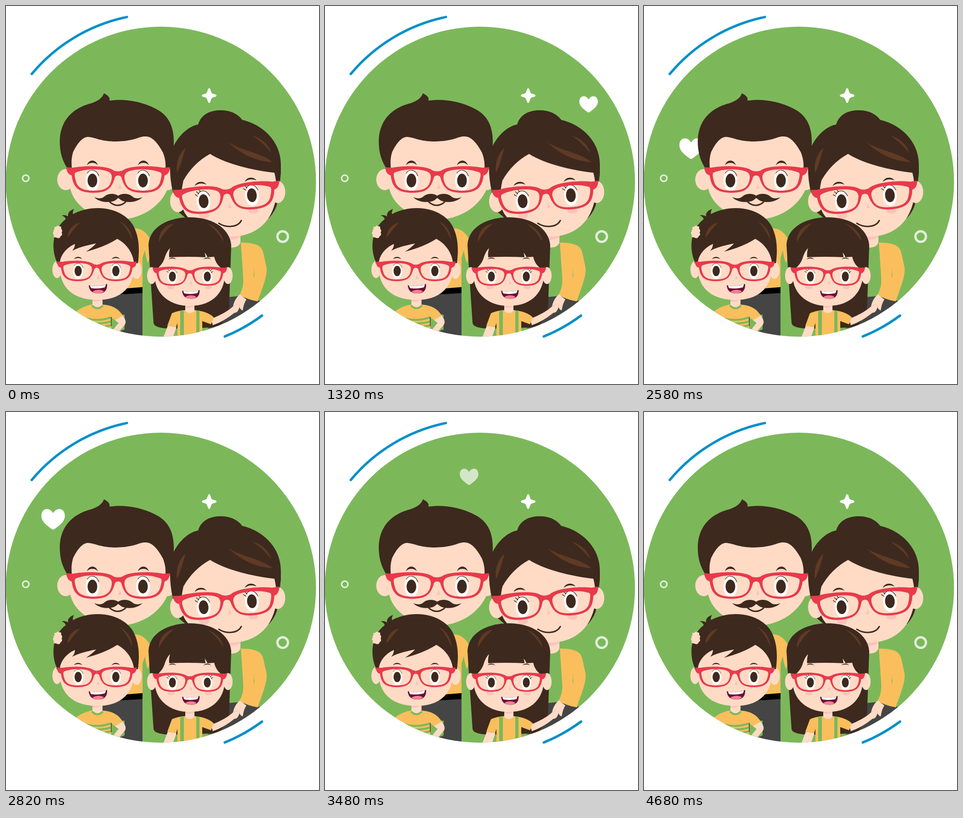
Write an HTML page that moves like this. It is 681 px wide and 823 px high and loops after 4800 ms.

```html
<!DOCTYPE html>
<html lang="en">
<head>
<meta charset="utf-8">
<title>Family portrait</title>
<style>
html, body { margin: 0; width: 100%; height: 100%; overflow: hidden; background: #fff; }
svg { display: block; }
.skin { fill: #ffdbc6; }
.hair { fill: #3d291e; }
.shine { fill: #5f3a24; }
.red { fill: #e83a4b; }
.gold { fill: #fabf5c; }
.green { fill: #7cb85a; }
.grey { fill: #454545; }
.pink { fill: #fcc3ba; }
.white { fill: #fff; }
.line { fill: none; stroke: #3d291e; stroke-linecap: round; }
</style>
</head>
<body>
<svg width="681" height="823" viewBox="0 0 681 823">
<defs>
  <clipPath id="disc"><circle cx="337" cy="382.5" r="337.5"/></clipPath>
  <path id="heart" d="M0 9C-4 2-9 0-13 0C-21 0-25.5 6-25.5 15C-25.5 29-10 38-4 43Q0 46 4 43C10 38 25.5 29 25.5 15C25.5 6 21 0 13 0C9 0 4 2 0 9Z"/>
  <path id="rim" fill-rule="evenodd" d="M0-18C-5-18-9-19-13-22C-30-31-73-31-98-26L-113-27C-112-18-109-11-101-9C-99 8-93 20-79 25C-65 30-43 30-29 25C-14 19-10 5-7-5Q-5-9 0-9Z
    M-93-15C-75-24-34-25-19-16C-12-11-13-3-16 6C-20 18-30 24-54 24C-76 24-87 18-91 6C-94-4-96-12-93-15Z"/>
  <g id="glasses" class="red"><use href="#rim"/><use href="#rim" transform="scale(-1 1)"/></g>
  <g id="eye">
    <ellipse class="white" rx="15" ry="23"/>
    <path class="line" stroke-width="1.2" d="M-11-16C-6-25 8-26 14-10"/>
    <ellipse class="hair" rx="10.5" ry="15"/>
  </g>
  <path id="lashes" class="line" stroke-width="1.4" d="M-12-12L-17-16M-9-17L-14-22M-5-21L-8-26"/>
  <path id="brow" class="hair" d="M-12 4C-8-7 7-8 12 4C6-2-6-2-12 4Z"/>
  <path id="nose" class="pink" d="M-2-8C-1-3 4 2 4 5C3 9-3 8-4 4C0 5 0 0-2-8Z"/>
  <g id="mouth">
    <path fill="#6c1034" d="M-20-8C-7-5 8-6 20-11C21 3 14 10 1 10C-12 10-19 4-20-8Z"/>
    <path class="white" d="M-17-7.500C-6-5 8-6 17-10Q17-5 14-3C5-1-7 0-15-2Q-17-5-17-7.500Z"/>
    <path fill="#f77f93" d="M-12 6C-5 1 7 1 13 5Q9 10 1 10Q-8 10-12 6Z"/>
  </g>
</defs>

<g clip-path="url(#disc)">
  <rect class="green" width="681" height="823"/>
  <g id="hearts" class="white"></g>
  <path class="white" d="M442 179Q444.500 179 445 183C447 190 448 191 454 192Q458 193 458 195Q458 197 454 198C448 199 447 201 445 207Q444 211 442 211Q440 211 439 207C437 201 436 199 430 198Q426 197 426 195Q426 193 430 192C436 191 437 189 439 183Q440 179 442 179Z"/>
  <g fill="none" stroke="#fff" stroke-opacity=".78">
    <circle cx="43" cy="375" r="6.900" stroke-width="3.300"/>
    <circle cx="602" cy="502" r="11.500" stroke-width="5"/>
  </g>

  <g id="dad">
    <path class="gold" d="M240 484H280C300 484 314 502 319 522L309 560Q305 552 302 532L297 548V613L240 617Z"/>
    <path class="grey" d="M205 632L297 624V725H205Z"/>
    <path d="M248 616L297 612V625L248 628Z"/>
    <ellipse class="skin" cx="130" cy="378" rx="18.500" ry="23"/>
    <ellipse class="skin" cx="352" cy="378" rx="18" ry="23"/>
    <path class="skin" d="M146 290C134 330 133 375 141 402C153 442 200 465 243 465C290 465 334 440 352 398C360 370 354 320 341 290L300 270H180Z"/>
    <path class="hair" d="M146 318C141 335 143 345 143 353H133C122 335 117 318 117 295C117 250 145 222 185 212C200 207 210 200 213 190C222 195 227 199 225 206C265 200 305 212 330 226C355 240 366 265 365 300L361 352H347C348 340 345 327 341 318C331 300 319 284 304 284C290 283 282 294 240 295C205 295 195 286 178 285C165 286 155 300 146 318Z"/>
    <use href="#brow" transform="translate(188 342) scale(1 1.200)"/><use href="#brow" transform="translate(299 342) scale(1 1.200)"/>
    <use href="#eye" x="188" y="380"/><use href="#eye" x="298" y="380"/>
    <use href="#nose" transform="translate(247 391)"/>
    <path class="line" stroke-width="3" d="M226 427Q243 441 260 427"/>
    <path class="hair" d="M244 413C236 407 222 408 215 414C208 420 201 420 192 416C203 429 228 429 238 423Q242 420 244 418Q247 420 251 423C261 429 285 429 297 416C288 420 281 420 274 414C267 408 252 407 244 413Z"/>
    <use href="#glasses" x="244" y="378"/>
  </g>

  <g id="mom">
    <path class="hair" d="M360 315C355 345 356 375 363 405L377 450L394 464L572 462Q588 445 591 425L598 365V345C598 300 565 260 514 248C505 236 490 227 468 227C445 227 425 235 418 258C395 262 372 285 360 315Z"/>
    <path class="skin" d="M487 490H510V515Q506 526 490 526H480Z"/>
    <path class="pink" d="M487 500H509V504Q498 510 485 509Z"/>
    <ellipse class="skin" cx="374" cy="425" rx="17" ry="24"/>
    <ellipse class="skin" cx="591" cy="405" rx="16.500" ry="24"/>
    <path class="skin" d="M444 322C480 345 540 358 584 363C593 400 589 432 573 459C555 488 525 502 490 502C450 500 412 482 392 455C380 440 379 410 386 380C400 355 420 335 444 322Z"/>
    <g class="shine">
      <path d="M372 363C369 340 378 318 391 309C385 325 382 345 372 363Z"/>
      <path d="M484 297C518 317 555 319 580 340C545 338 513 324 484 297Z"/>
      <path d="M536 282C560 289 573 305 577 320C564 304 553 294 536 282Z"/>
    </g>
    <g class="pink"><ellipse cx="431" cy="456" rx="11" ry="7"/><ellipse cx="538" cy="446" rx="11" ry="6"/></g>
    <use href="#brow" transform="translate(423 387) rotate(-6) scale(1.080 .9)"/>
    <use href="#brow" transform="translate(532 378) rotate(-6) scale(1.080 .9)"/>
    <g transform="translate(430 425) rotate(-5)"><use href="#eye"/><use href="#lashes"/></g>
    <g transform="translate(535 412) rotate(-5)"><use href="#eye"/><use href="#lashes"/></g>
    <use href="#nose" transform="translate(486 433) rotate(-5)"/>
    <path class="line" stroke-width="3" d="M463 473C478 483 504 483 512 467"/>
    <use href="#glasses" transform="translate(481 418) rotate(-5) scale(1.030)"/>
    <path class="grey" d="M470 635L512 631L556 643L600 640V725H425L440 700Z"/>
    <path class="gold" d="M511 515C540 516 556 519 560 538L567 570C569 590 555 620 548 643Q527 640 508 629Q518 612 516 590Z"/>
    <path class="green" d="M541 570Q537 578 540 594Q541 583 539 579Z"/>
  </g>

  <g id="boy">
    <path class="green" d="M229 672H258V704L229 716Z"/>
    <path class="gold" d="M150 667C163 656 178 651 188 650H210C235 652 246 661 254 674L237 684L228 677L230 725H165V690Z"/>
    <g fill="none" stroke="#7cb85a" stroke-width="4">
      <path d="M173 680Q201 688 228 678M180 689Q205 694 228 687M190 698Q210 700 229 695"/>
    </g>
    <path fill="none" stroke="#454545" stroke-width="1.500" d="M229 677V697"/>
    <path class="skin" d="M237 684L254 674C262 685 262 691 256 697L238 718H228L232 706L245 690Z"/>
    <path class="skin" d="M188 630H210V653Q199 662 188 653Z"/>
    <path class="pink" d="M188 638H210V640Q199 645 188 643Z"/>
    <path fill="none" stroke="#7cb85a" stroke-width="4" d="M187 652Q199 664 211 652"/>
    <ellipse class="skin" cx="111" cy="574" rx="10" ry="18.500"/>
    <ellipse class="skin" cx="284" cy="575" rx="11" ry="19"/>
    <path class="hair" d="M110 556C97 525 102 485 130 464Q128 458 121 456Q129 454 135 458C134 450 139 445 148 442Q144 449 146 453C190 430 250 438 275 475C290 500 291 530 287 560H110Z"/>
    <path class="skin" d="M117 560C118 545 128 528 150 518Q150 526 144 533Q160 524 196 517Q188 526 174 535Q216 524 242 507C262 517 275 537 278 556C282 605 258 640 197 640C138 639 114 605 117 560Z"/>
    <path class="shine" d="M134 504C134 488 146 474 161 472C150 482 143 494 134 504ZM247 468C263 476 275 493 275 511C268 494 260 480 247 468Z"/>
    <path class="skin" d="M106 486Q103 480 109 481Q112 476 117 480Q121 479 120 485Q124 489 121 493Q124 499 119 501Q117 508 109 504Q102 504 104 498Q100 494 104 491Q102 487 106 486Z"/>
    <use href="#brow" transform="translate(157 549) scale(.75 .6)"/><use href="#brow" transform="translate(239 549) scale(.75 .6)"/>
    <use href="#eye" transform="translate(157 577) scale(.75)"/><use href="#eye" transform="translate(239 577) scale(.75)"/>
    <use href="#nose" transform="translate(200 588) scale(.9)"/>
    <use href="#mouth" x="200" y="616"/>
    <use href="#glasses" transform="translate(197.500 577) scale(.77)"/>
  </g>

  <g id="girl">
    <path class="hair" d="M310 520C312 480 355 460 400 460C450 460 488 485 490 522L485 665L465 697Q430 703 350 702Q322 700 321 690L315 600Z"/>
    <path class="skin" d="M446 681C468 673 484 663 494 654C496 643 502 633 509 628L523 639Q517 648 515 663Q510 661 508 656Q504 669 497 668C482 680 467 689 450 695Z"/>
    <path fill="none" stroke="#f2b9a4" d="M494 654Q500 652 504 648M508 656L507 650"/>
    <path class="green" d="M427 703Q444 702 455 699L448 712H427Z"/>
    <path class="skin" d="M352 696L371 699L362 725H341Z"/>
    <path class="gold" d="M361 669C372 664 382 663 390 662H410C430 664 445 670 452 678L446 693L427 686V725H373V690L370 699L351 696Z"/>
    <path class="green" d="M379 664H387V725H379ZM414 663H421V725H414Z"/>
    <path class="skin" d="M390 645H410V664Q400 673 390 664Z"/>
    <path class="pink" d="M390 652H410V654Q400 659 390 656Z"/>
    <ellipse class="skin" cx="317" cy="587" rx="10" ry="18.500"/>
    <ellipse class="skin" cx="483" cy="587" rx="10" ry="18.500"/>
    <path class="skin" d="M324 577C336 566 343 558 346 546Q350 534 357 527Q354 537 355 547Q395 545 434 547Q434 542 432 537Q437 542 438 547L453 546C456 560 464 569 476 576C479 620 452 653 400 653C350 653 319 620 324 577Z"/>
    <path class="shine" d="M333 514C331 495 345 476 365 474C350 486 340 499 333 514ZM439 474C456 480 472 496 473 513C464 497 453 485 439 474Z"/>
    <g class="pink"><ellipse cx="359" cy="612" rx="8" ry="5"/><ellipse cx="440" cy="612" rx="8" ry="5"/></g>
    <use href="#brow" transform="translate(362 550) scale(.7 .5)"/><use href="#brow" transform="translate(438 550) scale(.7 .5)"/>
    <g transform="translate(362 589) scale(.72)"><use href="#eye"/><use href="#lashes"/></g>
    <g transform="translate(438 589) scale(.72)"><use href="#eye"/><use href="#lashes" transform="scale(-1 1)"/></g>
    <use href="#nose" transform="translate(402 600) scale(.8)"/>
    <use href="#mouth" transform="translate(402 628) rotate(2) scale(.95)"/>
    <use href="#glasses" transform="translate(400 588.500) scale(.717)"/>
  </g>
</g>
<path fill="none" stroke="#0090c8" stroke-width="5.300" stroke-linecap="round" d="M56 148A366 366 0 0 1 263 24M476 719.500A366 366 0 0 0 557 674"/>
</svg>
<script>
const LOOP = 4800, STEP = 60, RISE = 720;
// each heart fades in, waits, then floats up past the rim of the disc
const hearts = [
  { x: 573.5, y: 265, size: 0.79, fade: [300, 780], rise: 1020, lift: 185 },
  { x: 102.5, y: 212 + 80, size: 1, fade: [1560, 2280], rise: 2520, lift: 218 },
  { x: 313.5, y: 123.5, size: 0.79, fade: [3000, 3720], rise: 3960, lift: 191 }
];
const layer = document.getElementById('hearts');
const clamp = v => Math.min(1, Math.max(0, v));
const ease = v => (1 - Math.cos(Math.PI * v)) / 2;

for (const h of hearts) {
  h.el = document.createElementNS('http://www.w3.org/2000/svg', 'use');
  h.el.setAttribute('href', '#heart');
  layer.append(h.el);
}

function draw(now) {
  const t = Math.floor(now % LOOP / STEP) * STEP;
  for (const { el, x, y, size, fade: [from, to], rise, lift } of hearts) {
    const up = clamp((t - rise) / RISE);
    const alpha = up < 1 ? clamp((t - from) / (to - from)) : 0;
    el.setAttribute('transform', `translate(${x} ${y - lift * ease(up)}) scale(${size})`);
    el.setAttribute('opacity', alpha);
  }
  requestAnimationFrame(draw);
}
draw(performance.now());
</script>
</body>
</html>
```
